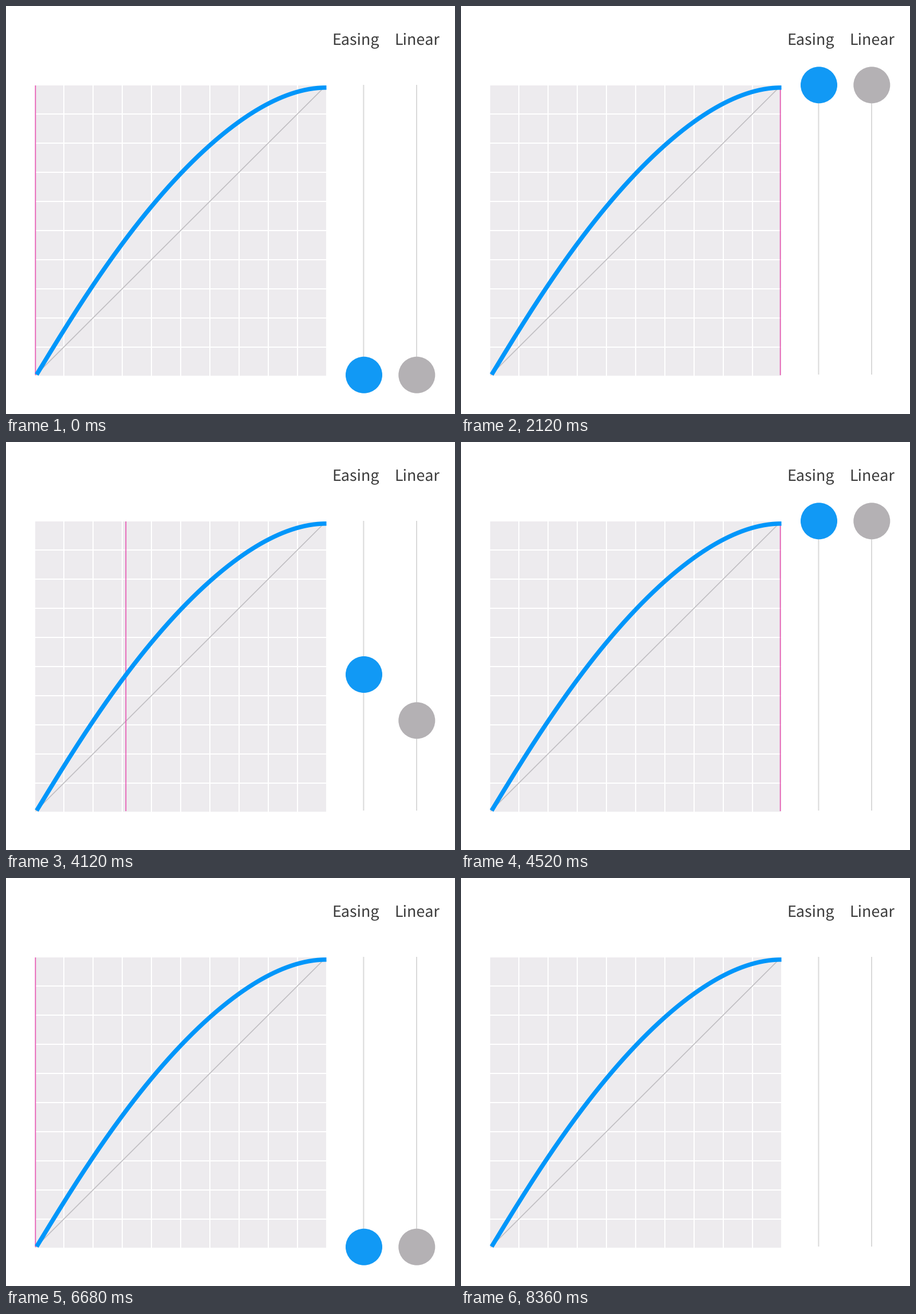
Animation, 784 px wide and 714 px high, one loop 8.68 s. Source, as a matplotlib script:

```python
import numpy as np
import matplotlib.pyplot as plt
from matplotlib.animation import FuncAnimation
from matplotlib.patches import Circle, Rectangle

W, H, DPI = 784, 714, 64
STEP, FRAMES = 40, 217
RAMP = 1250 / 3  # ms for a sweep or a fade
PX = 72 / DPI

BLUE, DOT_BLUE, GRAY, PINK = "#0096fa", "#1199f5", "#b4b1b4", "#e656b2"
PANEL, RAIL, DIAGONAL, INK = "#edebee", "#dadada", "#bfbdc1", "#3c3c3c"

# fade-in, sweep and fade-out start times in ms
CYCLES = [(-1000, 1200, 2220), (3146, 3990, 4975), (5940, 6787, 7815)]

plt.rcParams["text.hinting"] = "none"
fig = plt.figure(figsize=(W / DPI, H / DPI), dpi=DPI, facecolor="white")
ax = fig.add_axes([0, 0, 1, 1])
ax.set(xlim=(0, W), ylim=(H, 0))
ax.axis("off")


def line(xs, ys, color, width, z, **kw):
    return ax.plot(xs, ys, color=color, lw=width * PX, zorder=z,
                   solid_capstyle="butt", **kw)[0]


def dot(x, color):
    return ax.add_patch(Circle((x, 0), 32, fc=color, lw=0, zorder=6))


def ramp(t):
    return min(max(t / RAMP, 0), 1)


def ease(p):
    """Quadratic Bezier (0,0) (0.6,1) (1,1) evaluated at x = p."""
    s = 3 - np.sqrt(9 - 5 * p)
    return 2 * s - s * s


# chart, its curve drawn slightly fuller in the lower half
ax.add_patch(Rectangle((51, 138.5), 508, 508, fc=PANEL, lw=0, zorder=1))
for k in range(9):
    line([101 + 51 * k] * 2, [138.5, 646.5], "white", 2, 2)
    line([51, 559], [189 + 51 * k] * 2, "white", 2, 2)
line([52, 557], [645.8, 140.8], DIAGONAL, 1.6, 3)
p = np.linspace(0, 1, 200)
bulge = 0.35 * p**2 * (1 - p)**4
line(53.5 + 506 * p, 645 - 502.2 * (ease(p) + bulge), BLUE, 7.6, 5)

# rails and labels
for x, name, left, base in [(624.4, "Easing", 569.5, 68),
                            (717, "Linear", 678.2, 69)]:
    line([x, x], [138, 645], RAIL, 2, 2, snap=False)
    ax.text(left, base, name, color=INK, family="Noto Sans CJK JP",
            fontsize=26.9 * PX, va="baseline")

marker = line([51, 51], [139, 646], PINK, 1.7, 4, snap=False)
eased, linear = dot(625, DOT_BLUE), dot(717.3, GRAY)


def update(i):
    t = i * STEP
    start, sweep, end = [c for c in CYCLES if c[0] <= t][-1]
    alpha = min(ramp(t - start), 1 - ramp(t - end))
    p = ramp(t - sweep)
    marker.set_xdata([51.4 + 506.2 * p] * 2)
    eased.center = 625, 645.7 - 507.4 * ease(p)
    linear.center = 717.3, 645.7 - 507.4 * p
    for part in (marker, eased, linear):
        part.set_alpha(alpha)
    return marker, eased, linear


anim = FuncAnimation(fig, update, frames=FRAMES, interval=STEP,
                     repeat=True, repeat_delay=0)
plt.show()
```
